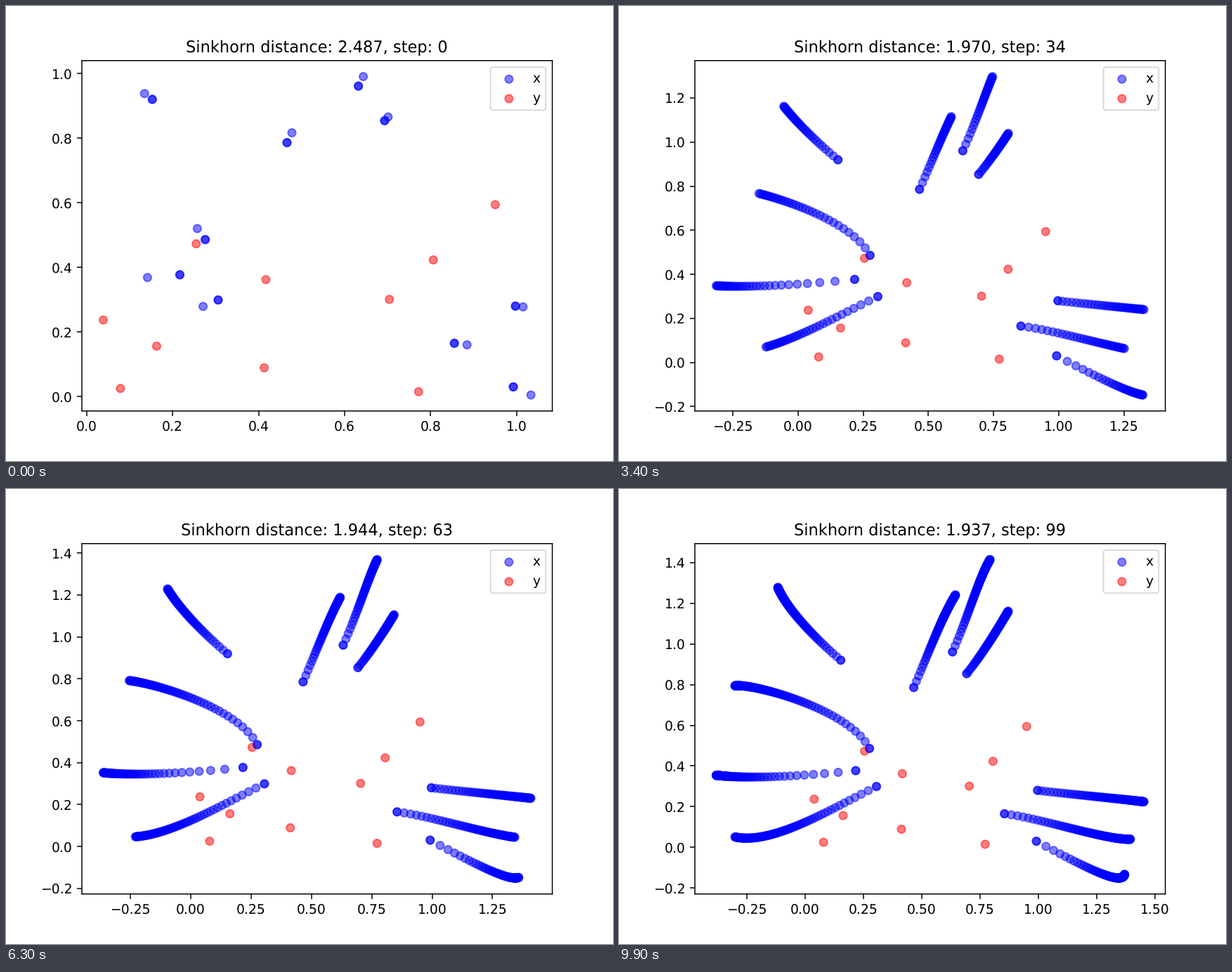
Animation, 864 px wide and 648 px high, one loop 10000 ms. Source, as a matplotlib script:

```python
import matplotlib.pyplot as plt
import numpy as np
from matplotlib.animation import FuncAnimation

STEPS = 100
KEY_STEPS = np.array([0, 6, 35, 100])

# Where each moving point is at the key steps
KEYS = np.array([
    [(.153, .920), (.072, 1.004), (-.055, 1.163), (-.117, 1.278)],
    [(.632, .961), (.679, 1.092), (.746, 1.298), (.793, 1.415)],
    [(.693, .854), (.731, .911), (.807, 1.040), (.871, 1.161)],
    [(.466, .786), (.514, .917), (.588, 1.116), (.645, 1.241)],
    [(.276, .486), (.155, .622), (-.150, .767), (-.301, .794)],
    [(.217, .377), (-.064, .351), (-.314, .348), (-.381, .354)],
    [(.306, .299), (.148, .206), (-.123, .070), (-.301, .051)],
    [(.997, .280), (1.098, .267), (1.327, .240), (1.453, .224)],
    [(.855, .165), (.996, .134), (1.252, .063), (1.395, .040)],
    [(.992, .030), (1.153, -.067), (1.323, -.148), (1.370, -.133)],
])
TARGET = np.array([
    (.039, .237), (.079, .025), (.163, .156), (.255, .473), (.417, .362),
    (.413, .089), (.704, .301), (.772, .015), (.806, .423), (.950, .594),
])


def warp(step):
    """Log time: quick first moves, then an ever slower drift."""
    return np.log1p(step / 5)


def loss(step):
    return 1.935 + 0.552 * np.exp(-(step / 7.45) ** (2 / 3))


# One cubic in log time per coordinate, through the key points
flat_keys = KEYS.swapaxes(0, 1).reshape(len(KEY_STEPS), -1)
cubic = np.polyfit(warp(KEY_STEPS), flat_keys, 3)
track = np.vander(warp(np.arange(STEPS + 1)), 4) @ cubic
track = track.reshape(STEPS + 1, -1, 2)

plt.rcParams.update({"path.snap": False, "text.hinting": "none"})
fig, ax = plt.subplots(figsize=(6.4, 4.8), dpi=135)


def dots(points, color, label=None):
    # A colour per dot keeps the centres off the pixel grid.
    return ax.scatter(*points.T, color=[color] * len(points), alpha=0.5,
                      label=label)


dots(track[0], "blue", "x")
dots(TARGET, "red", "y")
trail = dots(track[0], "blue")
ax.legend(loc="upper right")
title = ax.set_title("")


def update(step):
    points = track[:step + 2].reshape(-1, 2)
    trail.set_offsets(points)
    visible = np.vstack([points, TARGET])
    low, high = visible.min(axis=0), visible.max(axis=0)
    pad = 0.05 * (high - low)
    ax.set_xlim(low[0] - pad[0], high[0] + pad[0])
    ax.set_ylim(low[1] - pad[1], high[1] + pad[1])
    title.set_text(f"Sinkhorn distance: {loss(step):.3f}, step: {step}")
    return trail, title


anim = FuncAnimation(fig, update, frames=STEPS, interval=100,
                     repeat=True, repeat_delay=0, blit=False)
plt.show()
```
